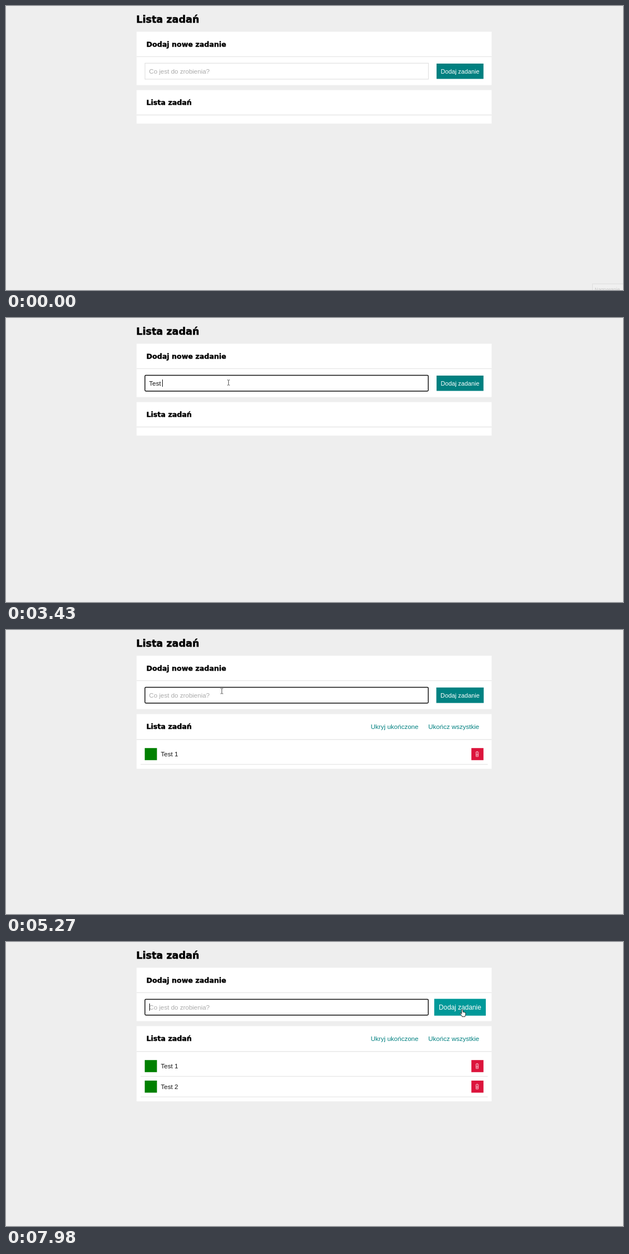
An HTML page for the animation above (8 s loop, 1102 by 508 pixels).

```html
<!DOCTYPE html>
<html lang="pl">
<head>
<meta charset="utf-8">
<title>Lista zadań</title>
<style>
  html, body { margin: 0; width: 100%; height: 100%; overflow: hidden; background: #eee; }
  svg { display: block; width: 100%; height: 100%; }
  text { font: 11.52px "Liberation Sans", Arial, sans-serif; fill: #111; white-space: pre; }
  .head { font: 700 12.58px "DejaVu Sans", sans-serif; fill: #000; stroke: #000; stroke-width: .4; }
  .title { font-size: 17.5px; stroke-width: .55; }
  .link { fill: teal; }
  .hint { fill: #aaa; }
  .label { font-size: 10.8px; fill: #fff; }
  .line { fill: #e6e6e6; }
  .panel { fill: #fff; }
</style>
</head>
<body>
<svg viewBox="0 0 1102 508">
  <rect width="1102" height="508" fill="#eee"/>
  <text class="head title" x="232.6" y="30.4">Lista zadań</text>

  <rect class="panel" x="233.3" y="46" width="634" height="95.5"/>
  <text class="head" x="250.8" y="72.6">Dodaj nowe zadanie</text>
  <rect class="line" x="233.3" y="90" width="634" height="1.2"/>
  <rect id="field" fill="#fff"/>
  <text id="hint" class="hint" x="255.6" y="120.5">Co jest do zrobienia?</text>
  <text id="entry" x="255.6" y="120.5"></text>
  <rect id="caret" y="110" width="1" height="13" fill="#111"/>
  <g id="button">
    <rect id="face" x="-41.9" y="-13.7" width="83.8" height="27.4"/>
    <text class="label" y="3.8" text-anchor="middle">Dodaj zadanie</text>
  </g>

  <rect id="list" class="panel" x="233.3" y="150.4" width="634"/>
  <text class="head" x="250.8" y="176.8">Lista zadań</text>
  <rect id="divider" class="line" x="233.3" width="634" height="1.4"/>
  <g id="links">
    <text class="link" x="651.5" y="177">Ukryj ukończone</text>
    <text class="link" x="754.3" y="177">Ukończ wszystkie</text>
  </g>
  <g id="rows"></g>

  <g id="notice">
    <rect x="1047.5" y="497" width="56" height="16" fill="#f0f0f0" stroke="#ddd"/>
    <text x="1051.5" y="510" style="font-size:8.5px;fill:#c8c8c8">Nagrywanie</text>
  </g>

  <g id="pointer">
    <path id="beam" d="M-2.4 -4.6H-.6L0 -4.1L.6 -4.6H2.4M0 -4.1V4.1M-2.4 4.6H-.6L0 4.1L.6 4.6H2.4" fill="none" stroke="#444" stroke-width=".9"/>
    <path id="hand" d="M-1.2 .6Q0 -.9 1.1 .6V4.3Q2.1 3.6 2.9 4.7Q4 4.1 4.6 5.2Q5.9 4.9 5.9 6.4V8.6Q5.8 10 4.9 11V12.6H-.6V11.2Q-2.4 9.2 -3.9 7.2Q-4 5.6 -2.3 6.3L-1.2 7.5Z" fill="#fff" stroke="#111" stroke-width=".85" stroke-linejoin="round"/>
    <path id="arrow" d="M0 0V12L2.8 9.4L4.6 13.5L6.4 12.7L4.6 8.7H8.4Z" fill="#fff" stroke="#111" stroke-width=".8"/>
  </g>
</svg>
<script>
const LOOP = 8000, BLINK = 530, ROW = 36.7;
const $ = id => document.getElementById(id);
const set = (el, attrs) => { for (const k in attrs) el.setAttribute(k, attrs[k]); };
const show = (el, on) => { el.style.display = on ? '' : 'none'; };

// Time and field content after each keystroke, focus or submit
const typing = [
  [940, ''], [1790, 'T'], [2710, 'Te'], [2840, 'Tes'], [2960, 'Test'], [3430, 'Test '], [3630, 'Test 1'],
  [4460, ''], [5690, 'T'], [5890, 'Te'], [6090, 'Tes'], [6220, 'Test'], [6820, 'Test '], [6950, 'Test 2'],
  [7650, '']
];
const added = [4460, 7650];
const presses = [[4390, 4460], [7580, 7650]];

// Pointer path: time, x, y
const path = [
  [60, 1085, 525], [200, 900, 400], [400, 620, 235], [600, 450, 140], [800, 397.5, 115.5],
  [3690, 397.5, 115.5], [3850, 540, 121], [4010, 768, 125], [4150, 811, 123],
  [4610, 811, 123], [4690, 768, 123], [4730, 563.5, 122], [4870, 455, 105], [5030, 400, 106], [5200, 385.5, 109.3],
  [6830, 385.5, 109.3], [6960, 545, 122], [7100, 768, 127], [7200, 808, 129], [7330, 815, 121]
];

function pointerAt(t) {
  const i = path.findIndex(p => p[0] > t);
  if (i < 0) return path[path.length - 1].slice(1);
  if (!i) return path[0].slice(1);
  const a = path[i - 1], b = path[i], k = (t - a[0]) / (b[0] - a[0]);
  return [a[1] + (b[1] - a[1]) * k, a[2] + (b[2] - a[2]) * k];
}

// CSS "ease" curve: cubic-bezier(.25, .1, .25, 1)
function ease(x) {
  if (x <= 0) return 0;
  if (x >= 1) return 1;
  const bez = (a, b, s) => 3 * a * s * (1 - s) ** 2 + 3 * b * s * s * (1 - s) + s ** 3;
  let lo = 0, hi = 1;
  for (let i = 0; i < 24; i++) {
    const mid = (lo + hi) / 2;
    if (bez(.25, .25, mid) < x) lo = mid; else hi = mid;
  }
  return bez(.1, 1, lo);
}

// One second hover transition; leaving early shortens the way back
function hover(t) {
  if (t < 4700) return ease((t - 4010) / 1000);
  if (t >= 7100) return ease((t - 7100) / 1000);
  const peak = ease(.69);
  return peak * (1 - ease((t - 4700) / (1000 * peak)));
}

const row = (name, i) => `<g transform="translate(0 ${i * ROW})">
  <rect x="247.8" y="211.2" width="21.8" height="21.6" fill="green"/>
  <text x="276.6" y="226">${name}</text>
  <rect x="831.2" y="211.2" width="21.6" height="21.6" fill="#dc143c"/>
  <path d="M838.6 218.6H844.4M840.3 217.4H842.7M839.2 219.5L839.6 226.4H843.4L843.8 219.5M840.8 220.5V225M842.2 220.5V225" fill="none" stroke="#fbd5dc" stroke-width=".8"/>
  <rect class="line" x="240.5" y="239.8" width="620" height="1.2"/></g>`;
$('rows').innerHTML = added.map((_, i) => row('Test ' + (i + 1), i)).join('');

function draw(t) {
  const last = typing.filter(e => e[0] <= t).pop();
  const pressed = presses.some(([a, b]) => t >= a && t < b);
  const focused = Boolean(last) && !pressed;
  const value = last ? last[1] : '';

  set($('field'), focused
    ? { x: 248.2, y: 102.4, width: 506, height: 28.3, rx: 1.6, stroke: '#101010', 'stroke-width': 1.45 }
    : { x: 248.2, y: 102.3, width: 506.2, height: 28.6, rx: 0, stroke: '#ddd', 'stroke-width': 1 });
  $('entry').textContent = value;
  show($('hint'), !value);
  show($('caret'), focused && Math.floor((t - last[0]) / BLINK) % 2 === 0);
  const end = 255.6 + (value ? $('entry').getComputedTextLength() : 0);
  set($('caret'), { x: Math.max(256, Math.floor(end)) });

  const h = hover(t);
  set($('button'), { transform: `translate(810.9 116.7) scale(${1 + h * .1})` });
  set($('face'), { fill: `hsl(180, 100%, ${25 + h * 5}%)` });

  const count = added.filter(a => t >= a).length;
  set($('list'), { height: count ? 61.2 + count * ROW : 60 });
  set($('divider'), { y: count ? 195.2 : 194.2 });
  show($('links'), count);
  [...$('rows').children].forEach((el, i) => show(el, i < count));

  $('notice').style.opacity = Math.max(0, 1 - Math.max(0, t - 60) / 120);

  const [x, y] = pointerAt(t);
  const inside = (l, r, top, bottom) => x > l && x < r && y > top && y < bottom;
  const onField = inside(247, 755, 102, 132), onButton = inside(765, 857, 102, 132);
  set($('pointer'), { transform: `translate(${x} ${y})` });
  show($('pointer'), t >= 70);
  show($('beam'), onField);
  show($('hand'), onButton);
  show($('arrow'), !onField && !onButton);
}

const start = performance.now();
function frame() {
  draw((performance.now() - start) % LOOP);
  requestAnimationFrame(frame);
}
frame();
</script>
</body>
</html>
```
